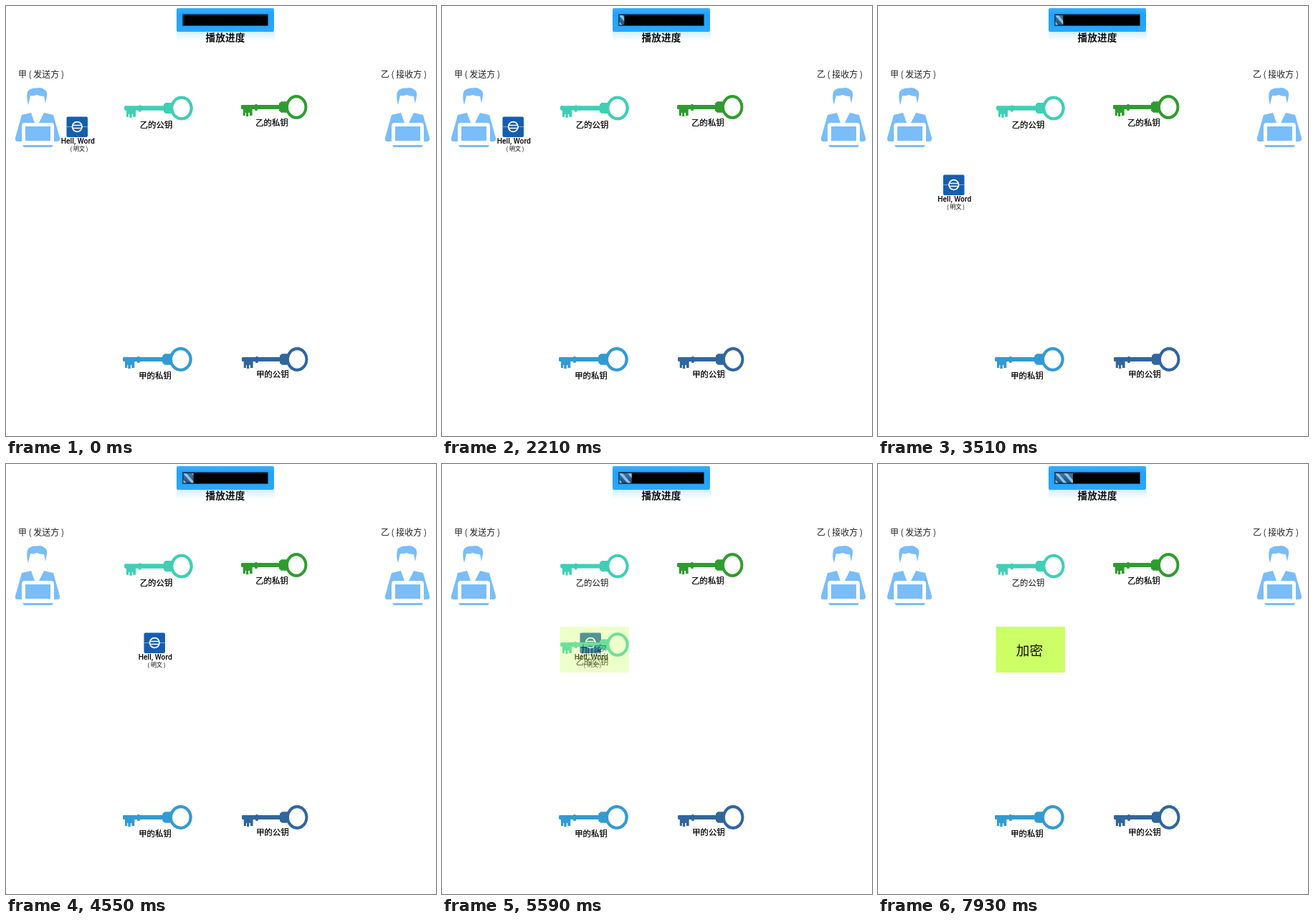
Recreate the animation shown at these times as an HTML page. Size 600 by 600 pixels, loop 8000 ms.

```html
<!DOCTYPE html>
<html lang="zh-CN">
<head>
<meta charset="utf-8">
<style>
  html, body { margin: 0; width: 100%; height: 100%; overflow: hidden; background: #fff; }
  svg { display: block; width: 100%; height: 100%; }
  text { font-family: "Noto Sans CJK SC", "Noto Sans CJK", sans-serif; text-anchor: middle; fill: #111; }
  .latin { font-family: Roboto, sans-serif; font-size: 10.3px; font-weight: 500; fill: #000; }
  .label { font-size: 11.4px; }
  .note { font-size: 8px; font-weight: 500; fill: #000; }
  .role { font-size: 12px; fill: #222; }
</style>
</head>
<body>
<svg viewBox="0 0 600 600">
  <defs>
    <linearGradient id="panel" x2="0" y2="1">
      <stop offset="0" stop-color="#38adff"/>
      <stop offset=".3" stop-color="#20a2ff"/>
      <stop offset="1" stop-color="#2aa8ff"/>
    </linearGradient>
    <linearGradient id="mirror" x2="0" y2="1">
      <stop offset="0" stop-color="#d3efff"/>
      <stop offset="1" stop-color="#fff"/>
    </linearGradient>
    <linearGradient id="gloss" x2="0" y2="1">
      <stop offset="0" stop-color="#3c78a8"/>
      <stop offset="1" stop-color="#1d4f7c"/>
    </linearGradient>
    <pattern id="stripes" width="12" height="14" x="247" y="13" patternUnits="userSpaceOnUse">
      <rect width="12" height="14" fill="url(#gloss)"/>
      <path d="M-12 0h5l12 14h-5zM0 0h5l12 14h-5z" fill="#8fbfe0"/>
    </pattern>

    <g id="person" fill="#7abdf8">
      <path d="M31 138Q28 128 30 120Q33 114 43 114.500Q50 113 54 117Q58 119 57 126L55 136L53 126Q47 126 43 124Q38 126 34 125Z"/>
      <path d="M22 152L35 149L40 163H26Q22 163 22 168V189H16Q12 189 13 184Z"/>
      <path d="M53 149L66 152L75 184Q76 189 71 189H67V168Q67 163 63 163H46Z"/>
      <path d="M27 168H62V188H27ZM23 194H66L64 197H25Z"/>
    </g>

    <g id="key">
      <path d="M1-3H56V3H16V12H12.500V8H10.500V13H7.500V8H6V12H3V3H1Q-1 0 1-3Z" fill="currentColor"/>
      <rect x="20" y="-4" width="3.500" height="9" rx="1.500" fill="currentColor"/>
      <path d="M55-5L58-7.500H68V7.500H58L55 5Z" fill="currentColor"/>
      <ellipse cx="80" rx="13.600" ry="14.800" fill="#fff" stroke="currentColor" stroke-width="4"/>
    </g>

    <g id="tile">
      <rect x="84.500" y="154.500" width="29.500" height="28.500" rx="2" fill="#155eaf"/>
      <path d="M84.500 168.500H114" stroke="#7fa9d8"/>
      <circle cx="99.300" cy="168.500" r="6.800" fill="#155eaf" stroke="#fff" stroke-width="1.800"/>
      <path d="M93 166.500H105.600M93 170.500H105.600" stroke="#fff" stroke-width="1.400"/>
    </g>
  </defs>

  <rect x="238" y="36" width="137" height="13" fill="url(#mirror)"/>
  <rect x="238" y="3" width="136" height="33" rx="2" fill="url(#panel)"/>
  <rect x="246" y="11" width="120" height="17" rx="1" fill="#0d4a7c"/>
  <rect x="247.500" y="12.500" width="117.500" height="14.500" fill="#000"/>
  <rect id="progress" x="247.500" y="13" height="13.500" fill="url(#stripes)"/>
  <text x="306" y="48.500" font-size="13.700" font-weight="700">播放进度</text>

  <text class="role" x="49" y="99.500">甲 ( 发送方 )</text>
  <text class="role" x="555" y="99.500">乙 ( 接收方 )</text>
  <use href="#person"/>
  <use href="#person" x="516"/>

  <g id="keys"></g>

  <g id="plain">
    <use href="#tile"/>
    <text class="latin" x="100.300" y="192">Hell, Word</text>
    <text class="note" x="102" y="201.500">( 明文 )</text>
  </g>
  <g id="keyCopy"></g>
  <g id="cipher">
    <use href="#tile"/>
    <text class="latin" x="100.300" y="192">#$%@&amp;*</text>
    <text class="note" x="102" y="201.500">( 密文 )</text>
  </g>
  <g id="encrypt">
    <rect x="164.500" y="227" width="96.500" height="64" fill="#cf6"/>
    <text x="211.500" y="266.500" font-size="18.700">加密</text>
  </g>
</svg>
<script>
const LOOP = 8000, STEP = 130, MOVE = 7 * STEP;
const el = id => document.getElementById(id);

const key = (x, y, scale, color, name, labelX, labelY) =>
  `<use href="#key" color="${color}" transform="translate(${x} ${y}) scale(${scale} 1)"/>
   <text class="label" x="${labelX}" y="${labelY}">${name}</text>`;

const publicB = key(165, 142.5, 1, '#3ecfb5', '乙的公钥', 209.5, 170.3);
const others = [
  key(328, 141, .965, '#309c30', '乙的私钥', 371, 167.3),
  key(163, 493, 1.01, '#329bd2', '甲的私钥', 208, 520.3),
  key(329, 493, .965, '#30669e', '甲的公钥', 372, 518.3)
].join('');

// Every key lies on top of its own duplicate until that duplicate is used.
el('keys').innerHTML = publicB + others + others;
el('keyCopy').innerHTML = publicB;

const ramp = (t, start, length = MOVE) => Math.min(1, Math.max(0, (t - start) / length));
const place = (id, x, y) => el(id).setAttribute('transform', `translate(${x} ${y})`);
const show = (id, visible) => el(id).setAttribute('visibility', visible ? 'visible' : 'hidden');

// A blink hides its object for the first half of the cycle.
const blinkedOff = (t, start) => t >= start && t < start + MOVE / 2;

function draw(time) {
  const t = time < 3 * STEP ? 0 : Math.floor(time / STEP) * STEP;

  el('progress').setAttribute('width', t * .0031);

  const down = ramp(t, 2210), right = ramp(t, 3640);
  place('plain', 6.5 * down + 101.5 * right, 81 * down);
  show('plain', !blinkedOff(t, 390) && !blinkedOff(t, 1300) && t < 6240);

  place('keyCopy', 0, 109.5 * ramp(t, 4550));
  el('encrypt').setAttribute('opacity', ramp(t, 5460, 3 * STEP));

  place('cipher', 108 + 80.5 * ramp(t, 6240), 86);
  show('cipher', t >= 6240 && !blinkedOff(t, 7670));
}

function frame(now) {
  draw(now % LOOP);
  requestAnimationFrame(frame);
}
draw(0);
requestAnimationFrame(frame);
</script>
</body>
</html>
```
